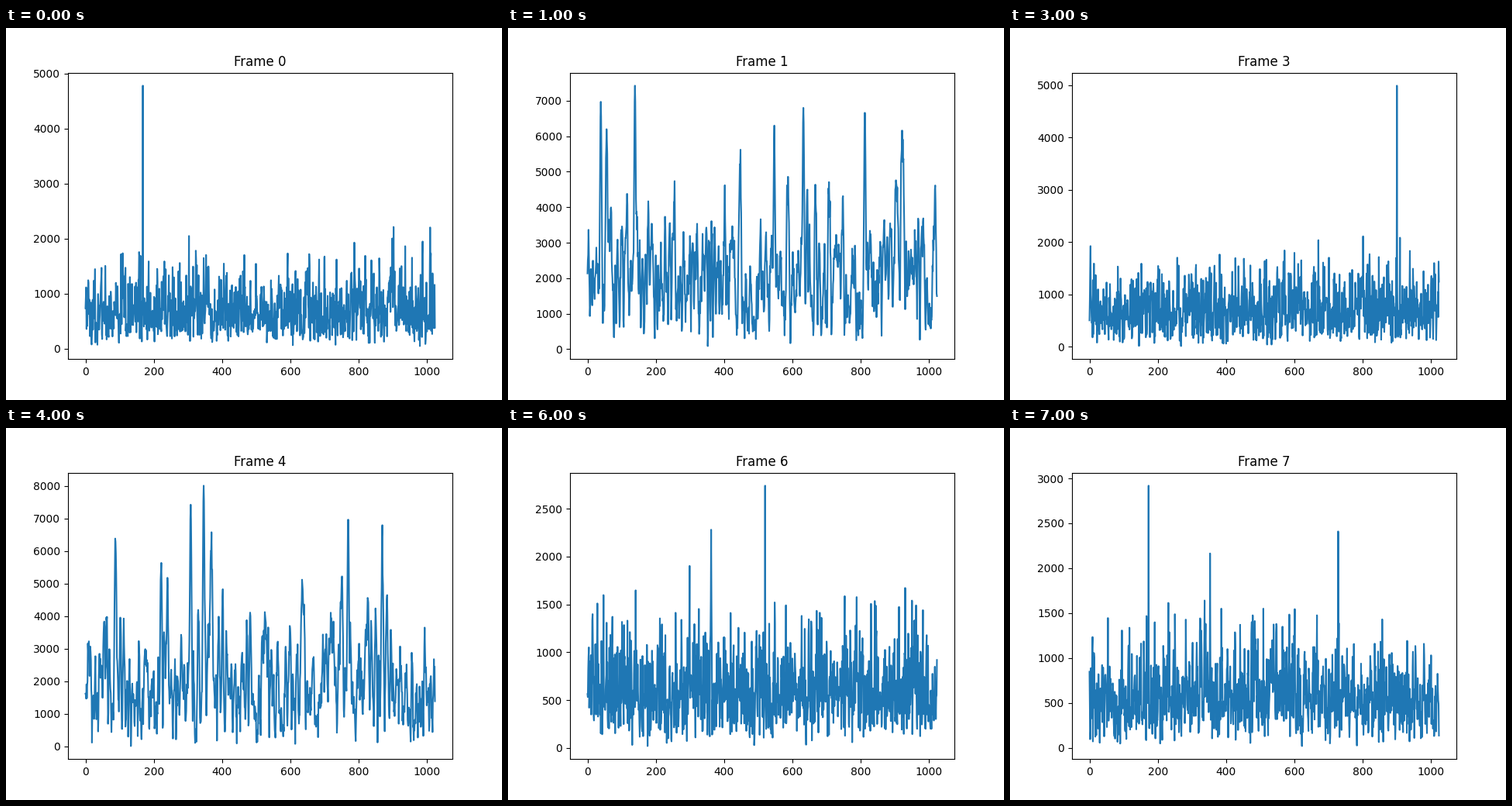
Write a matplotlib script that moves like this. It is 640x480 px and loops after 8 s.

```python
import numpy as np
import matplotlib.pyplot as plt
from matplotlib.animation import FuncAnimation

N = 1024
bins = np.arange(N)


def complex_noise(rng, blur):
    """Unit complex Gaussian noise, correlated over about `blur` bins."""
    k = np.arange(-12, 13)
    kernel = np.exp(-0.5 * (k / blur) ** 2)
    kernel /= np.sqrt(np.sum(kernel ** 2))
    raw = rng.standard_normal(N) + 1j * rng.standard_normal(N)
    return np.convolve(raw, kernel, mode="same")


def bell(center, spread):
    return np.exp(-((bins - center) / spread) ** 2)


def add_peaks(y, width, peaks):
    for pos, height in peaks:
        y = np.maximum(y, height * bell(pos, width))
    return y


def narrow(seed, low, high, *peaks, envelope=1.0):
    """Rough noise floor between `low` and `high` with one-bin peaks."""
    rng = np.random.default_rng(seed)
    y = np.abs(envelope * complex_noise(rng, 0.6))
    y = np.interp(y, (y.min(), y.max()), (low, high))
    return add_peaks(y, 0.7, peaks)


def wide(seed, low, high, *peaks):
    """Smooth lobes between `low` and `high` with broad peaks."""
    rng = np.random.default_rng(seed)
    y = np.abs(complex_noise(rng, 2.5) + 0.17 * complex_noise(rng, 0.4))
    y = np.interp(y, (y.min(), y.max()), (low, high))
    return add_peaks(y, 4, peaks)


spectra = [
    narrow(11, 50, 2215, (168, 4783)),
    wide(12, 88, 6300, (139, 7424), (39, 6970), (632, 6800), (812, 6660)),
    wide(13, 45, 9300, (431, 10450)),
    narrow(14, 13, 2110, (900, 4988)),
    wide(15, 12, 6800, (346, 8014), (308, 7430), (769, 6970)),
    narrow(16, 14, 2150, (760, 2560), envelope=1 + 0.3 * bell(755, 60)),
    narrow(17, 19, 2280, (520, 2740)),
    narrow(18, 22, 2165, (173, 2919), (728, 2410),
           envelope=1 + 0.25 * bell(500, 350)),
]

fig, ax = plt.subplots(figsize=(6.4, 4.8), dpi=100)


def draw(i):
    ax.clear()
    ax.plot(bins, spectra[i], color="#1f77b4", lw=1.5)
    ax.set_title(f"Frame {i}")
    return ax.lines


anim = FuncAnimation(fig, draw, frames=len(spectra), interval=1000,
                     repeat=True, repeat_delay=0)
plt.show()
```
